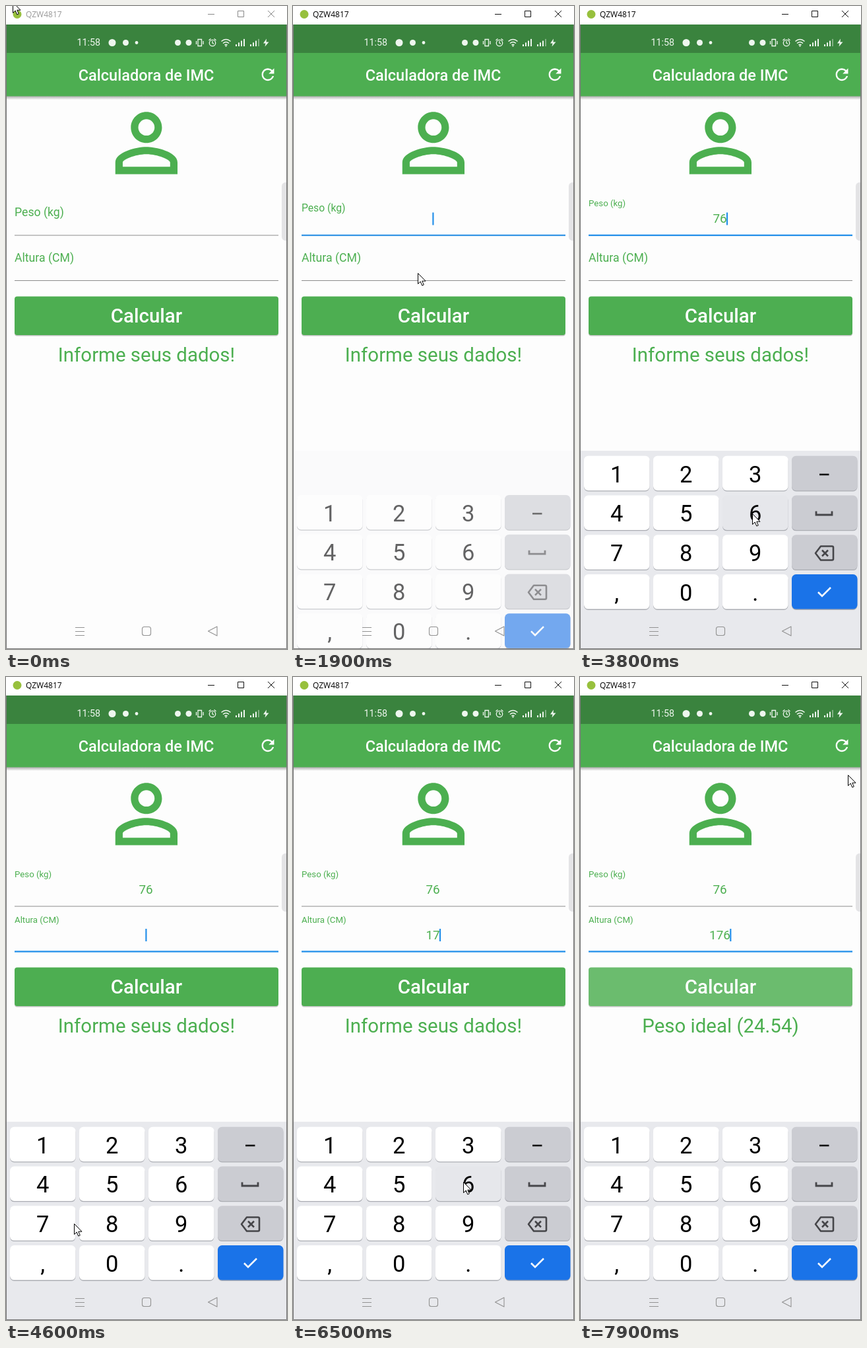
These frames come from a looping animation (426 px wide and 973 px high, 8 s). An HTML page:

```html
<!DOCTYPE html>
<html lang="pt">
<head>
<meta charset="utf-8">
<title>Calculadora de IMC</title>
<style>
  html, body { margin: 0; width: 100%; height: 100%; overflow: hidden; background: #fdfdfd; }
  svg { display: block; width: 426px; height: 973px; font-family: Roboto, sans-serif; }
  .mid { text-anchor: middle; }
  .green { fill: #4caf50; }
  .line { fill: none; }
</style>
</head>
<body>
<svg viewBox="0 0 426 973">
  <defs>
    <linearGradient id="shade" x2="0" y2="1">
      <stop stop-color="#000" stop-opacity=".34"/>
      <stop offset="1" stop-color="#000" stop-opacity="0"/>
    </linearGradient>
    <clipPath id="buttonClip"><rect x="13" y="439.5" width="400" height="58.5" rx="4"/></clipPath>
  </defs>

  <rect width="426" height="973" fill="#fdfdfd"/>

  <!-- title bar -->
  <rect width="426" height="28" fill="#fff"/>
  <circle cx="17" cy="12.5" r="6.5" fill="#97c03d"/>
  <g id="titleBar">
    <text x="30" y="17" font-size="12" font-family="'Open Sans', sans-serif" textLength="">QZW4817</text>
    <path class="line" stroke="currentColor" d="M306 12.5h10M351.5 7.5h9v9h-9zM397 7l10 10m0-10l-10 10"/>
  </g>

  <!-- status bar -->
  <rect y="28" width="426" height="43" fill="#3a833e"/>
  <g fill="#eef6ee" stroke="none">
    <text x="107.5" y="60" font-size="14.3">11:58</text>
    <circle cx="161" cy="55.5" r="5.5"/>
    <circle cx="181.5" cy="55.5" r="4.5"/>
    <circle cx="198" cy="55.5" r="2.4"/>
    <circle cx="260.5" cy="55.5" r="4.5"/>
    <circle cx="277" cy="55.5" r="4.5"/>
    <path d="M395 49.5l-5 7h3.500l-1 5 6-7h-4z"/>
    <g id="signals"></g>
  </g>
  <g class="line" stroke="#eef6ee" stroke-width="1.3">
    <path d="M291 50.500h5.500v10h-5.500zM288.500 53v5M299 53v5"/>
    <circle cx="313" cy="56" r="4.700"/>
    <path d="M313 53v3l2 1.500M307.500 52l3-2.500M318.500 52l-3-2.500"/>
    <path stroke-width="1.600" d="M326.500 53.500q7-6 14 0M329 56.500q4.500-4 9 0M331.500 59q2-1.500 4 0"/>
    <path d="M333.500 59.500v2" stroke-width="2"/>
  </g>

  <!-- app bar -->
  <rect y="136" width="426" height="6" fill="url(#shade)"/>
  <rect y="71" width="426" height="65.500" fill="#4dae51"/>
  <text class="mid" x="212.500" y="112.500" font-size="23.5" font-weight="500" fill="#fff">Calculadora de IMC</text>
  <path transform="translate(382.900 89.600) scale(1.178)" fill="#fff" d="M17.65 6.35A7.958 7.958 0 0 0 12 4c-4.420 0-7.990 3.580-7.990 8s3.570 8 7.990 8c3.730 0 6.840-2.550 7.730-6h-2.080A5.990 5.990 0 0 1 12 18c-3.310 0-6-2.690-6-6s2.690-6 6-6c1.660 0 3.140.69 4.220 1.780L13 11h7V4z"/>

  <!-- person -->
  <path class="green" fill-rule="evenodd" transform="translate(142.200 136.600) scale(5.89)" d="M12 5.900a2.100 2.100 0 1 1 0 4.200 2.100 2.100 0 0 1 0-4.200m0 9c2.970 0 6.100 1.460 6.100 2.100v1.100H5.900V17c0-.64 3.130-2.100 6.100-2.100M12 4C9.790 4 8 5.790 8 8s1.790 4 4 4 4-1.790 4-4-1.790-4-4-4zm0 9c-2.670 0-8 1.340-8 4v3h16v-3c0-2.660-5.330-4-8-4z"/>

  <g id="fields"></g>

  <!-- button and result -->
  <rect x="13" y="441.500" width="400" height="58" rx="4" fill="#000" opacity=".22"/>
  <rect x="13" y="439.500" width="400" height="58.500" rx="4" fill="#4dae51"/>
  <circle id="ripple" cx="240" cy="469" fill="#fff" opacity=".17" clip-path="url(#buttonClip)"/>
  <text class="mid" x="213" y="479" font-size="29.45" font-weight="500" fill="#fff">Calcular</text>
  <text id="result" class="mid green" x="213" y="537.500" font-size="29.45"></text>

  <path d="M426 267h-3q-5 1-5 6v76q0 5 5 6h3z" fill="#e4e4e6"/>

  <!-- keyboard -->
  <rect id="board" y="673" width="426" height="300" fill="#e8e9ed"/>
  <g id="keys"></g>

  <!-- navigation -->
  <g class="line" stroke="#929292" stroke-width="1.100">
    <path d="M105 940.500h14M105 946.500h14M105 952.500h14"/>
    <rect x="206.500" y="939.500" width="13" height="13" rx="3"/>
    <path d="M306.500 946l13.500-7v14z" stroke-linejoin="round"/>
  </g>

  <path class="line" stroke="#777" d="M.5 28V972.500H425.500V28"/>
  <path id="mouse" d="M.5.5v16l3.700-3.500 2.600 6 2.500-1.100-2.500-5.700h5.200z" fill="#fff" stroke="#000"/>
</svg>

<script>
const LOOP = 8000;
const HOLDS = [100, 1200, 2300, 3500, 4700, 5800, 7000]; // ticks without a new picture
const FOCUS_WEIGHT = 1800, FOCUS_HEIGHT = 4300, CALCULATE = 7400;

// time, x, y of the pointer tip
const PATH = [
  [0, 10, -6], [100, 10, -6], [1000, 218, 322], [1600, 205, 328], [1900, 189, 404],
  [2900, 73, 825], [3300, 73, 825], [3700, 261, 768], [3900, 261, 768], [4200, 212, 392],
  [4300, 212, 392], [4600, 103, 827], [4800, 103, 827], [5400, 79, 698], [5700, 79, 698],
  [6100, 70, 827], [6200, 70, 827], [6500, 258, 764], [6700, 258, 764], [7100, 240, 469],
  [7400, 240, 469], [7900, 406, 148]
];
const PRESSES = [[3200, '7'], [3700, '6'], [5600, '1'], [6100, '7'], [6500, '6']];

const $ = id => document.getElementById(id);
const ramp = (t, a, b) => Math.min(1, Math.max(0, (t - a) / (b - a)));
const lerp = (a, b, p) => a + (b - a) * p;
const smooth = p => p * p * (3 - 2 * p);

function buildSignals() {
  let bars = '';
  for (const x of [348, 370])
    for (let i = 0; i < 4; i++)
      bars += `<rect x="${x + i * 4}" y="${58 - i * 2.7}" width="2" height="${3 + i * 2.7}"
        opacity="${x === 370 && i === 3 ? .4 : 1}"/>`;
  $('signals').innerHTML = bars;
}

function buildKeys() {
  const icons = [
    '<path d="M363 709h14.500" stroke="#111" stroke-width="2.600"/>',
    '<path d="M358 764.500v5.500h24v-5.500" stroke="#46464a" stroke-width="2.800"/>',
    `<path d="M365 817.500h17q2 0 2 2v17q0 2-2 2h-17l-8-10.500z" stroke="#46464a" stroke-width="2.600" stroke-linejoin="round"/>
     <path d="M367 823.500l9 9m0-9l-9 9" stroke="#46464a" stroke-width="2.600"/>`,
    '<path d="M361 887l6 6 13-13" stroke="#fff" stroke-width="2.600"/>'
  ];
  let html = '';
  ['123', '456', '789', ',0.'].forEach((row, r) => {
    for (let c = 0; c < 4; c++) {
      const x = 6 + c * 105, y = 680.7 + r * 59.8, label = row[c];
      const fill = label ? '#fff' : r === 3 ? '#1a73e8' : '#cbccd2';
      const box = dy => `x="${x}" y="${y + dy}" width="99.500" height="52.500" rx="6.500"`;
      html += `<rect ${box(1.3)} fill="#abadb3"/><rect ${box(0)} fill="${fill}" data-key="${label || ''}"/>`;
      html += label
        ? `<text class="mid" x="${x + 49.7}" y="${y + 39.8}" font-size="34.500">${label}</text>`
        : `<g class="line">${icons[r]}</g>`;
    }
  });
  $('keys').innerHTML = html;
}

function makeField(label, y) {
  const g = document.createElementNS('http://www.w3.org/2000/svg', 'g');
  g.innerHTML = `<text class="green" x="13">${label}</text>
    <text class="mid green" x="212" y="${y - 19}" font-size="18.850"></text>
    <rect x="13" y="${y - .5}" width="400" height="1" fill="#8c8c8c"/>
    <rect x="13" y="${y - 1.2}" width="400" height="2.300" fill="#2490ea"/>
    <rect y="${y - 34.5}" width="2.200" height="19" fill="#2490ea"/>`;
  $('fields').append(g);
  const [name, value, , active, caret] = g.children;
  return (float, focus, text, caretOn) => {
    name.setAttribute('font-size', lerp(17.67, 13.25, float));
    name.setAttribute('y', lerp(y - 29, y - 44, float));
    value.textContent = text;
    active.setAttribute('opacity', focus);
    caret.setAttribute('x', 211.3 + text.length * 5.3);
    caret.setAttribute('opacity', caretOn ? 1 : 0);
  };
}

function pointerAt(t) {
  const i = Math.max(1, PATH.findIndex(p => p[0] >= t));
  const [a, x0, y0] = PATH[i - 1], [b, x1, y1] = PATH[i];
  const p = smooth(ramp(t, a, b));
  return [lerp(x0, x1, p), lerp(y0, y1, p)];
}

// The caret blinks every half second, starting again at each edit.
const blink = (t, edits) => {
  const last = edits.filter(e => e <= t).pop();
  return last !== undefined && (t - last) % 1000 < 500;
};
const typed = (t, text, times) => text.slice(0, times.filter(e => e <= t).length);

buildSignals();
buildKeys();
const weight = makeField('Peso (kg)', 347);
const height = makeField('Altura (CM)', 415.5);
const keyBoxes = [...document.querySelectorAll('[data-key]')].filter(k => k.dataset.key);

function draw(t) {
  const active = t >= 1700;
  $('titleBar').setAttribute('fill', active ? '#000' : '#999');
  $('titleBar').setAttribute('color', active ? '#111' : '#888');

  const weightEdits = [3300, 3800], heightEdits = [5700, 6200, 6600];
  const moved = ramp(t, FOCUS_HEIGHT, FOCUS_HEIGHT + 200);
  weight(ramp(t, 1820, 2000), ramp(t, 1750, 1920) * (1 - moved), typed(t, '76', weightEdits),
    t < FOCUS_HEIGHT && blink(t, [FOCUS_WEIGHT, ...weightEdits]));
  height(smooth(moved), moved, typed(t, '176', heightEdits),
    blink(t, [FOCUS_HEIGHT, ...heightEdits]));

  $('ripple').setAttribute('r', 260 * ramp(t, CALCULATE - 100, CALCULATE + 200));
  $('result').textContent = t < CALCULATE ? 'Informe seus dados!' : 'Peso ideal (24.54)';

  const shown = ramp(t, 1750, 2000);
  $('board').setAttribute('opacity', shown ** 4);
  $('keys').setAttribute('opacity', shown);
  $('keys').setAttribute('transform', `translate(0 ${148 * (1 - shown)})`);
  const press = PRESSES.find(([at]) => t >= at && t < at + 200);
  for (const k of keyBoxes)
    k.setAttribute('fill', press && press[1] === k.dataset.key ? '#e6e7eb' : '#fff');

  $('mouse').setAttribute('transform', `translate(${pointerAt(t)})`);
}

function tick() {
  let t = Math.floor(performance.now() % LOOP / 100) * 100;
  if (HOLDS.includes(t)) t -= 100;
  draw(t);
  requestAnimationFrame(tick);
}
tick();
</script>
</body>
</html>
```
